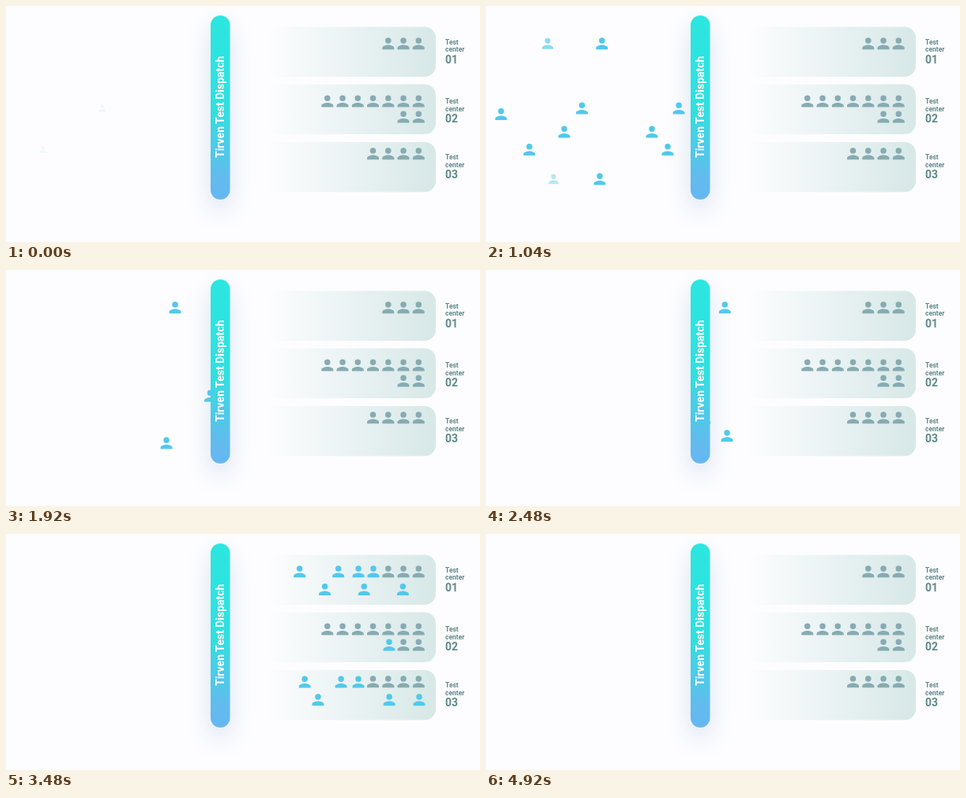
These frames come from a looping animation (600x300 px, 5 s). An HTML page:

```html
<!DOCTYPE html>
<html lang="en">
<head>
<meta charset="utf-8">
<title>Test dispatch</title>
<style>
  html, body { margin: 0; width: 100%; height: 100%; overflow: hidden; background: #fdfdff; }
  svg { display: block; width: 600px; height: 300px; font-family: Roboto, sans-serif; font-weight: 700; }
  .label { fill: #5f898c; font-size: 8.5px; }
  .label .number { font-size: 14px; }
  .title { fill: #fff; font-size: 14px; }
</style>
</head>
<body>
<svg viewBox="0 0 600 300">
  <defs>
    <linearGradient id="barFill" x2="0" y2="1">
      <stop offset="0" stop-color="#2ce6df"/>
      <stop offset=".5" stop-color="#30e0e0"/>
      <stop offset=".88" stop-color="#62bbee"/>
      <stop offset="1" stop-color="#66b7f0"/>
    </linearGradient>
    <linearGradient id="cardFill">
      <stop offset="0" stop-color="#d7e8e7" stop-opacity="0"/>
      <stop offset="1" stop-color="#d7e8e7"/>
    </linearGradient>
    <linearGradient id="personFill" gradientUnits="userSpaceOnUse" x1="0" y1="-7.5" x2="0" y2="7.5">
      <stop offset="0" stop-color="#30d8e0"/>
      <stop offset="1" stop-color="#52c8ec"/>
    </linearGradient>
    <filter id="blur" filterUnits="userSpaceOnUse" x="180" y="-60" width="190" height="420">
      <feGaussianBlur stdDeviation="15"/>
    </filter>
    <path id="person" transform="scale(.9375) translate(-12 -12)"
      d="M12 12a4 4 0 1 0 0-8a4 4 0 0 0 0 8zm0 2c-2.67 0-8 1.34-8 4v2h16v-2c0-2.66-5.33-4-8-4z"/>
  </defs>
  <rect x="259" y="26" width="24" height="234" rx="12" fill="#86a8cc" opacity=".32" filter="url(#blur)"/>
  <g id="cards"></g>
  <g id="waiting" fill="#86abb1"></g>
  <g id="moving" fill="url(#personFill)"></g>
  <rect x="259" y="12" width="24.5" height="234" rx="12.2" fill="url(#barFill)"/>
  <text class="title" transform="translate(276 193) rotate(-90)">Tirven Test Dispatch</text>
</svg>
<script>
const LOOP = 5000, STEP = 40, BAR_X = 271;
const ARRIVE_MS = 850, LEAVE_MS = 1040;
const APPEAR_LEAD = 455, APPEAR_MS = 160;
const FADE_START = 4330, FADE_MS = 470;

// Test centers: card top, label baseline
const centers = [[26.5, 48.6], [99.5, 124.2], [173, 195.2]];

// Rows of people already assigned: y, count
const waitingRows = [[47.7, 3], [121, 7], [141, 2], [187.7, 4]];

// People on the left: x, y, departure times
const arrivals = [
  [121.5, 130, [440, 1143]],
  [47, 182.5, [442, 927]],
  [99, 160, [542, 1231]],
  [78, 47.7, [687, 1390]],
  [85.5, 220, [709, 1428]],
  [19, 137.5, [1029]]
];

// People sent to a center: first slot x, y, slot spacing, departure times
const departures = [
  [465, 47.7, 18.9, [2190, 2380, 2590, 2812]],
  [523, 70.5, 19, [2648, 2776, 2887]],
  [485, 141, 19, [2424]],
  [446, 188, 18.9, [2347, 2542, 2777]],
  [523, 210.7, 19, [2214, 2647, 2912]]
];

const byId = id => document.getElementById(id);
const clamp = v => Math.min(1, Math.max(0, v));

function add(parent, tag, attributes, text = '') {
  const node = document.createElementNS('http://www.w3.org/2000/svg', tag);
  for (const name in attributes) node.setAttribute(name, attributes[name]);
  node.textContent = text;
  return parent.appendChild(node);
}

const addPerson = (group, x = 0, y = 0) =>
  add(group, 'use', { href: '#person', transform: `translate(${x} ${y})` });

// cubic-bezier(.42, 0, .58, 1)
function easeInOut(x) {
  if (x <= 0 || x >= 1) return clamp(x);
  let low = 0, high = 1, s;
  for (let i = 0; i < 16; i++) {
    s = (low + high) / 2;
    const r = 1 - s;
    if (1.26 * s * r * r + 1.74 * s * s * r + s ** 3 < x) low = s; else high = s;
  }
  return s * s * (3 - 2 * s);
}

centers.forEach(([top, baseline], i) => {
  const cards = byId('cards');
  add(cards, 'rect', { x: 328, y: top, width: 216, height: 63.5, rx: 14, fill: 'url(#cardFill)' });
  const label = add(cards, 'text', { class: 'label' });
  add(label, 'tspan', { x: 556, y: baseline }, 'Test');
  add(label, 'tspan', { x: 556, y: baseline + 9.7 }, 'center');
  add(label, 'tspan', { x: 556, y: baseline + 24.2, class: 'number' }, `0${i + 1}`);
});

for (const [y, count] of waitingRows)
  for (let i = 0; i < count; i++) addPerson(byId('waiting'), 522.3 - 19.25 * i, y);

const people = [];
for (const [x, y, times] of arrivals)
  for (const start of times)
    people.push({ node: addPerson(byId('moving')), from: x, to: BAR_X, y, start, duration: ARRIVE_MS, arriving: true });
for (const [x, y, gap, times] of departures)
  times.forEach((start, i) =>
    people.push({ node: addPerson(byId('moving')), from: BAR_X, to: x - gap * i, y, start, duration: LEAVE_MS }));

function draw(time) {
  const fadeOut = 1 - clamp((time - FADE_START) / FADE_MS);
  for (const { node, from, to, y, start, duration, arriving } of people) {
    const x = from + (to - from) * easeInOut((time - start) / duration);
    const shown = arriving ? clamp((time - start + APPEAR_LEAD) / APPEAR_MS) : 1;
    const scale = 1 - 0.5 * (1 - shown) ** 2;
    node.setAttribute('transform', `translate(${x} ${y}) scale(${scale})`);
    node.setAttribute('opacity', shown * fadeOut);
  }
}

const origin = performance.now();
function tick() {
  const time = (performance.now() - origin) % LOOP;
  draw(Math.floor(time / STEP) * STEP);
  requestAnimationFrame(tick);
}
tick();
</script>
</body>
</html>
```
